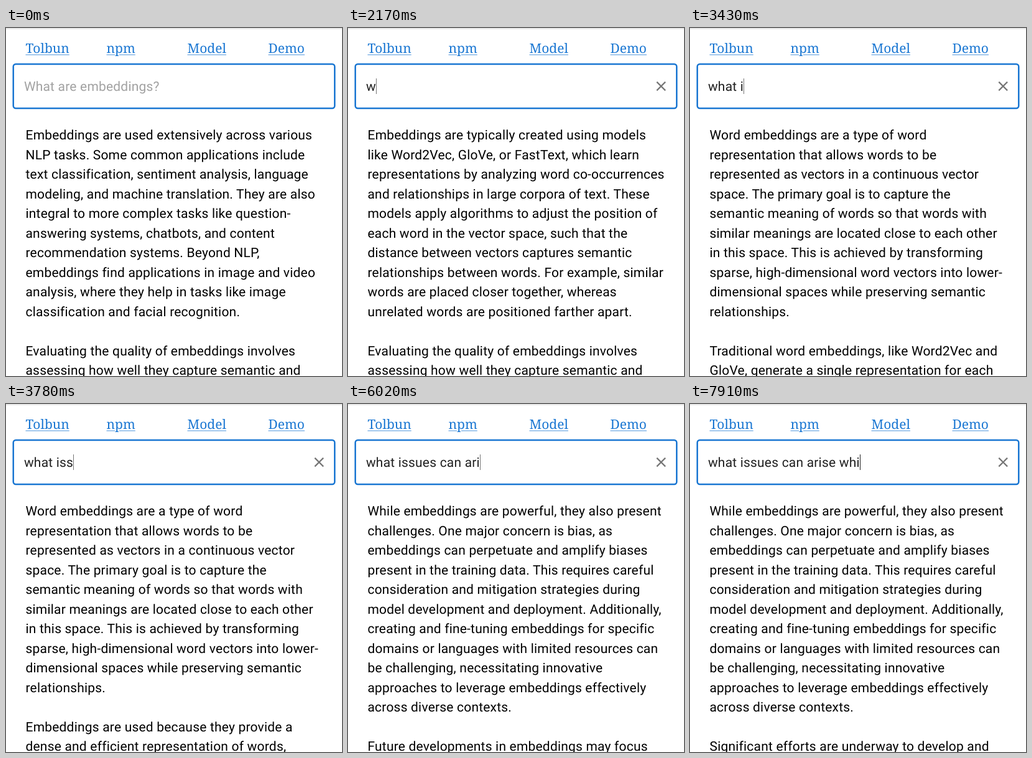
These frames come from a looping animation (540 by 559 pixels, 8000 ms). An HTML page:

```html
<!DOCTYPE html>
<html lang="en">
<head>
<meta charset="utf-8">
<title>Semantic search box</title>
<style>
  html, body { margin: 0; width: 100%; height: 100%; overflow: hidden; background: #fff; }
  #stage { position: relative; width: 540px; height: 559px; overflow: hidden; }
  svg { position: absolute; left: 0; top: 0; }
  nav span {
    position: absolute; top: 17px;
    font: 21px/32px "Noto Serif", serif;
    color: #1976d2;
    text-decoration: underline rgba(25, 118, 210, .4);
    text-rendering: geometricPrecision;
  }
  text {
    font: 21px Roboto, sans-serif;
    letter-spacing: .00938em;
    white-space: pre;
    text-rendering: geometricPrecision;
  }
</style>
</head>
<body>
<div id="stage">
  <svg width="540" height="559" viewBox="0 0 540 559">
    <rect y=".5" width="540" height="1.3" fill="#dedede"/>
    <rect x="11.75" y="58" width="516.5" height="71" rx="4" fill="none" stroke="#1976d2" stroke-width="2.5"/>
    <text id="hint" x="28.9" y="100.6" fill="#a2a2a2">What are embeddings?</text>
    <text id="query" x="28.9" y="100.6" fill="#212121"></text>
    <rect id="caret" y="81" width="1" height="25"/>
    <path id="clear" d="M496.3 86.6l13.8 13.8m0-13.8l-13.8 13.8" stroke="#757575" stroke-width="2.2"/>
    <g id="results" fill="#000"></g>
  </svg>
  <nav id="links"></nav>
</div>
<script>
const LOOP = 8000, LEFT = 28.9, LINE = 31.5, FIRST_BASELINE = 179.4;
const $ = id => document.getElementById(id);

const passages = {
  uses: `Embeddings are used extensively across various
NLP tasks. Some common applications include
text classification, sentiment analysis, language
modeling, and machine translation. They are also
integral to more complex tasks like question-
answering systems, chatbots, and content
recommendation systems. Beyond NLP,
embeddings find applications in image and video
analysis, where they help in tasks like image
classification and facial recognition.`,
  creation: `Embeddings are typically created using models
like Word2Vec, GloVe, or FastText, which learn
representations by analyzing word co-occurrences
and relationships in large corpora of text. These
models apply algorithms to adjust the position of
each word in the vector space, such that the
distance between vectors captures semantic
relationships between words. For example, similar
words are placed closer together, whereas
unrelated words are positioned farther apart.`,
  words: `Word embeddings are a type of word
representation that allows words to be
represented as vectors in a continuous vector
space. The primary goal is to capture the
semantic meaning of words so that words with
similar meanings are located close to each other
in this space. This is achieved by transforming
sparse, high-dimensional word vectors into lower-
dimensional spaces while preserving semantic
relationships.`,
  issues: `While embeddings are powerful, they also present
challenges. One major concern is bias, as
embeddings can perpetuate and amplify biases
present in the training data. This requires careful
consideration and mitigation strategies during
model development and deployment. Additionally,
creating and fine-tuning embeddings for specific
domains or languages with limited resources can
be challenging, necessitating innovative
approaches to leverage embeddings effectively
across diverse contexts.`,
  quality: `Evaluating the quality of embeddings involves
assessing how well they capture semantic and`,
  traditional: `Traditional word embeddings, like Word2Vec and
GloVe, generate a single representation for each`,
  reasons: `Embeddings are used because they provide a
dense and efficient representation of words,`,
  scaling: `Scaling embedding models presents several`,
  future: `Future developments in embeddings may focus`,
  efforts: `Significant efforts are underway to develop and`
};

// Start time of each result pair
const ranking = [
  [0, 'uses', 'quality'],
  [2170, 'creation', 'quality'],
  [2940, 'words', 'traditional'],
  [3500, 'words', 'reasons'],
  [4130, 'issues', 'scaling'],
  [5880, 'issues', 'future'],
  [7350, 'issues', 'efforts']
];

// One key press per character
const phrase = 'what issues can arise whi';
const keys = [
  2170, 2520, 2730, 2940, 3150, 3430, 3640, 3780, 3990, 4130, 4410, 4550, 4900,
  4970, 5180, 5390, 5600, 5880, 6020, 6230, 6370, 6790, 7350, 7630, 7910
];

['Tolbun', 'npm', 'Model', 'Demo'].forEach((label, i) => {
  const link = document.createElement('span');
  link.textContent = label;
  link.style.left = 31.5 + 130 * i + 'px';
  $('links').append(link);
});

// Prebuild every result pair, then only toggle them
const pages = ranking.map(([, first, second]) => {
  const page = document.createElementNS('http://www.w3.org/2000/svg', 'g');
  `${passages[first]}\n\n${passages[second]}`.split('\n').forEach((line, i) => {
    const row = document.createElementNS('http://www.w3.org/2000/svg', 'text');
    row.setAttribute('x', 31.5);
    row.setAttribute('y', FIRST_BASELINE + LINE * i);
    row.textContent = line;
    page.append(row);
  });
  $('results').append(page);
  return page;
});

const show = (el, on) => { el.style.display = on ? '' : 'none'; };

function draw(t) {
  const typed = keys.filter(k => k <= t).length;
  const current = ranking.filter(r => r[0] <= t).length - 1;
  pages.forEach((page, i) => show(page, i === current));

  const query = $('query');
  const value = phrase.slice(0, typed);
  if (query.textContent !== value) query.textContent = value;
  show($('hint'), !typed);
  show($('clear'), typed);

  const blinkOn = t >= 420 && Math.floor((t - 420) / 490) % 2 === 0;
  const end = LEFT + (typed ? query.getComputedTextLength() : 0);
  $('caret').setAttribute('x', Math.floor(end + .3));
  $('caret').setAttribute('fill', t < 6930 ? '#757575' : '#212121');
  show($('caret'), typed || blinkOn);
}

const start = performance.now();
function tick() {
  draw((performance.now() - start) % LOOP);
  requestAnimationFrame(tick);
}
tick();
</script>
</body>
</html>
```
